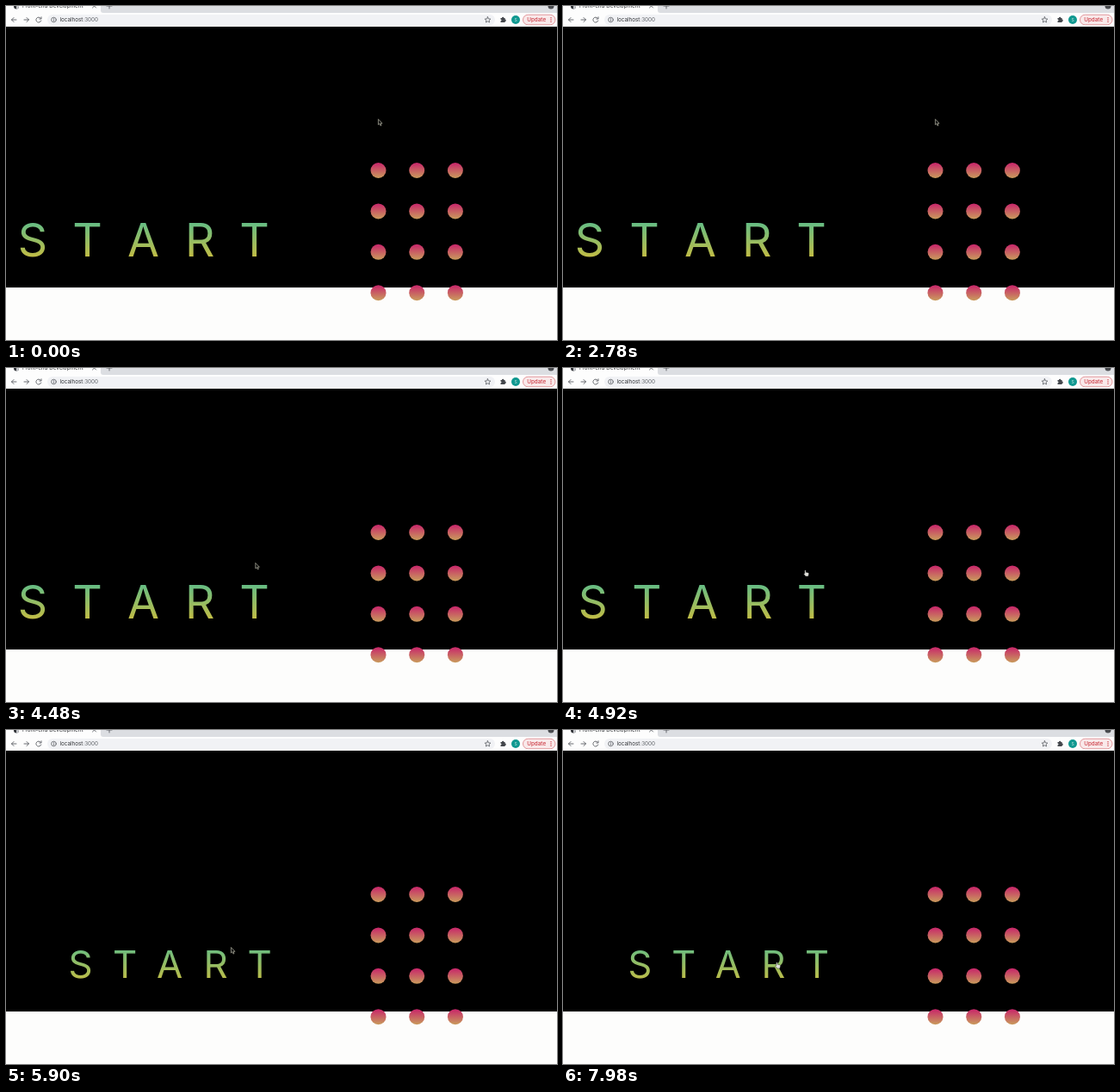
An HTML page that plays this animation: 640 px wide and 388 px high, repeating every 8 s.

```html
<!DOCTYPE html>
<html lang="en">
<head>
<meta charset="utf-8">
<title>Start</title>
<style>
  html, body { margin: 0; width: 100%; height: 100%; overflow: hidden; }
  svg { display: block; width: 100%; height: 100%; }
  text { font-family: Inter, Roboto, sans-serif; }
  .ui { font-size: 6.3px; fill: #303236; }
  .icon { fill: none; stroke: #5a5d62; stroke-width: .9; stroke-linecap: round; stroke-linejoin: round; }
</style>
</head>
<body>
<svg viewBox="0 0 640 388">
  <defs>
    <linearGradient id="wordFill" gradientUnits="userSpaceOnUse" x1="0" y1="252" x2="0" y2="292">
      <stop stop-color="#66bd84"/><stop offset="1" stop-color="#c2bc44"/>
    </linearGradient>
    <linearGradient id="dotFill" x1="0" y1="0" x2="0" y2="1">
      <stop stop-color="#c8246a"/><stop offset="1" stop-color="#c99c5c"/>
    </linearGradient>
  </defs>

  <rect width="640" height="388" fill="#fdfdfc"/>

  <!-- Tab strip -->
  <rect width="640" height="8" fill="#dcdee2"/>
  <path d="M0 0H110V5Q110 8 113 8H0Z" fill="#fdfdfd"/>
  <circle cx="12" cy="0.5" r="3" fill="#33353a"/>
  <path d="M12 -1V3.5A3 3 0 0 0 15 0Z" fill="#c4c6ca"/>
  <text class="ui" x="19" y="2.2">Front-end Development</text>
  <path class="icon" d="M100.5 -2L104.5 2M104.5 -2L100.5 2M117 0H123M120 -3V3"/>
  <circle cx="633" cy="0" r="3.5" fill="#484a4e"/>

  <!-- Toolbar -->
  <rect y="8" width="640" height="16" fill="#fdfdfd"/>
  <rect x="48" y="10" width="520" height="12" rx="6" fill="#f1f2f5"/>
  <g class="icon">
    <path d="M12 16H6.5M9 13.5L6.5 16L9 18.5"/>
    <path d="M21 16H26.5M24 13.5L26.5 16L24 18.5"/>
    <path d="M40.3 14.2A3 3 0 1 0 40.8 17M41 12.8V15H38.8"/>
    <circle cx="55.5" cy="16" r="2.8" stroke-width=".8"/>
    <path d="M55.5 15.8V17.4M55.5 14.5V14.6" stroke-width=".8"/>
    <path d="M559.5 12.7L560.5 14.9L562.9 15.1L561.1 16.7L561.6 19L559.5 17.8L557.4 19L557.9 16.7L556.1 15.1L558.5 14.9Z" stroke-width=".8"/>
  </g>
  <text class="ui" x="62.5" y="18.2">localhost<tspan fill="#66696e">:3000</tspan></text>
  <path d="M574.5 14H576A1.2 1.2 0 0 1 578.4 14H579.6V15.5A1.2 1.2 0 0 1 579.6 17.9V19H574.5V17.5A1 1 0 0 0 574.5 15.5Z" fill="#44474c"/>
  <circle cx="592" cy="16" r="5" fill="#109890"/>
  <text x="592" y="17.8" font-size="5" text-anchor="middle" fill="#d0ece8">S</text>
  <rect x="600.5" y="10.2" width="37.5" height="11.6" rx="5.8" fill="#f9e9ea" stroke="#dc8086" stroke-width=".8"/>
  <text x="605.3" y="18.2" font-size="6.3" font-weight="500" fill="#cc3a44">Update</text>
  <g fill="#cc3a44">
    <circle cx="633" cy="13.7" r=".7"/><circle cx="633" cy="16" r=".7"/><circle cx="633" cy="18.3" r=".7"/>
  </g>

  <!-- Page -->
  <rect y="24" width="640" height="303"/>
  <g id="dots" fill="url(#dotFill)"></g>
  <text id="word" text-anchor="middle" fill="url(#wordFill)">START</text>

  <g id="cursor" stroke-linejoin="round">
    <path id="arrow" d="M.4 .5V7L1.9 5.7L3 8.1L4 7.6L3 5.3H5Z" fill="#111" stroke="#b4b4a4" stroke-width=".7"/>
    <path id="hand" d="M1.8 1.2Q2.5 .5 3.1 1.2V3.2L6 3.9Q6.8 4.3 6.5 5.3L5.8 7.9H2.8L.7 5.3Q.7 4.5 1.8 4.8Z" fill="#e0e0da" stroke="#222" stroke-width=".4"/>
  </g>
</svg>
<script>
  const LOOP = 8000;
  const HOVER_START = 4660, HOVER_TIME = 1470;
  const wide = { size: 53.6, centers: [31, 94.5, 159.5, 225.3, 288.5] };
  const narrow = { size: 43.3, centers: [89.3, 140.3, 191.8, 244.5, 295] };
  // time, x, y of the pointer
  const pointerPath = [
    [3450, 432, 131], [3900, 367, 164], [4620, 283, 231], [4920, 279, 234],
    [5340, 263, 249], [5900, 261, 252], [6700, 261, 252], [7500, 246, 269]
  ];

  const byId = id => document.getElementById(id);
  const [word, cursor, arrow, hand] = ['word', 'cursor', 'arrow', 'hand'].map(byId);
  const mix = (a, b, p) => a + (b - a) * p;
  const clamp = p => Math.min(1, Math.max(0, p));

  // cubic-bezier(.42, 0, .58, 1)
  function easeInOut(p) {
    let low = 0, high = 1;
    for (let i = 0; i < 20; i++) {
      const u = (low + high) / 2, v = 1 - u;
      const x = 3 * v * v * u * .42 + 3 * v * u * u * .58 + u ** 3;
      if (x < p) low = u; else high = u;
    }
    return low * low * (3 - 2 * low);
  }

  function pointerAt(t) {
    const next = pointerPath.findIndex(key => key[0] > t);
    if (next === 0) return pointerPath[0].slice(1);
    if (next < 0) return pointerPath.at(-1).slice(1);
    const [t0, x0, y0] = pointerPath[next - 1], [t1, x1, y1] = pointerPath[next];
    const p = easeInOut((t - t0) / (t1 - t0));
    return [mix(x0, x1, p), mix(y0, y1, p)];
  }

  function render(t) {
    const p = easeInOut(clamp((t - HOVER_START) / HOVER_TIME));
    const size = mix(wide.size, narrow.size, p);
    word.setAttribute('font-size', size);
    word.setAttribute('x', wide.centers.map((x, i) => mix(x, narrow.centers[i], p)).join(' '));
    word.setAttribute('y', 271.8 + size * .3636);

    const pointing = (t >= HOVER_START && t < 5200) || t >= 7200;
    cursor.setAttribute('transform', `translate(${pointerAt(t)})`);
    arrow.style.display = pointing ? 'none' : '';
    hand.style.display = pointing ? '' : 'none';
  }

  for (let i = 0; i < 12; i++) {
    const dot = document.createElementNS('http://www.w3.org/2000/svg', 'circle');
    dot.setAttribute('cx', 432.5 + i % 3 * 44.7);
    dot.setAttribute('cy', 191 + Math.floor(i / 3) * 47.4);
    dot.setAttribute('r', 9);
    byId('dots').append(dot);
  }

  const start = performance.now();
  function tick() {
    render((performance.now() - start) % LOOP);
    requestAnimationFrame(tick);
  }
  tick();
</script>
</body>
</html>
```
